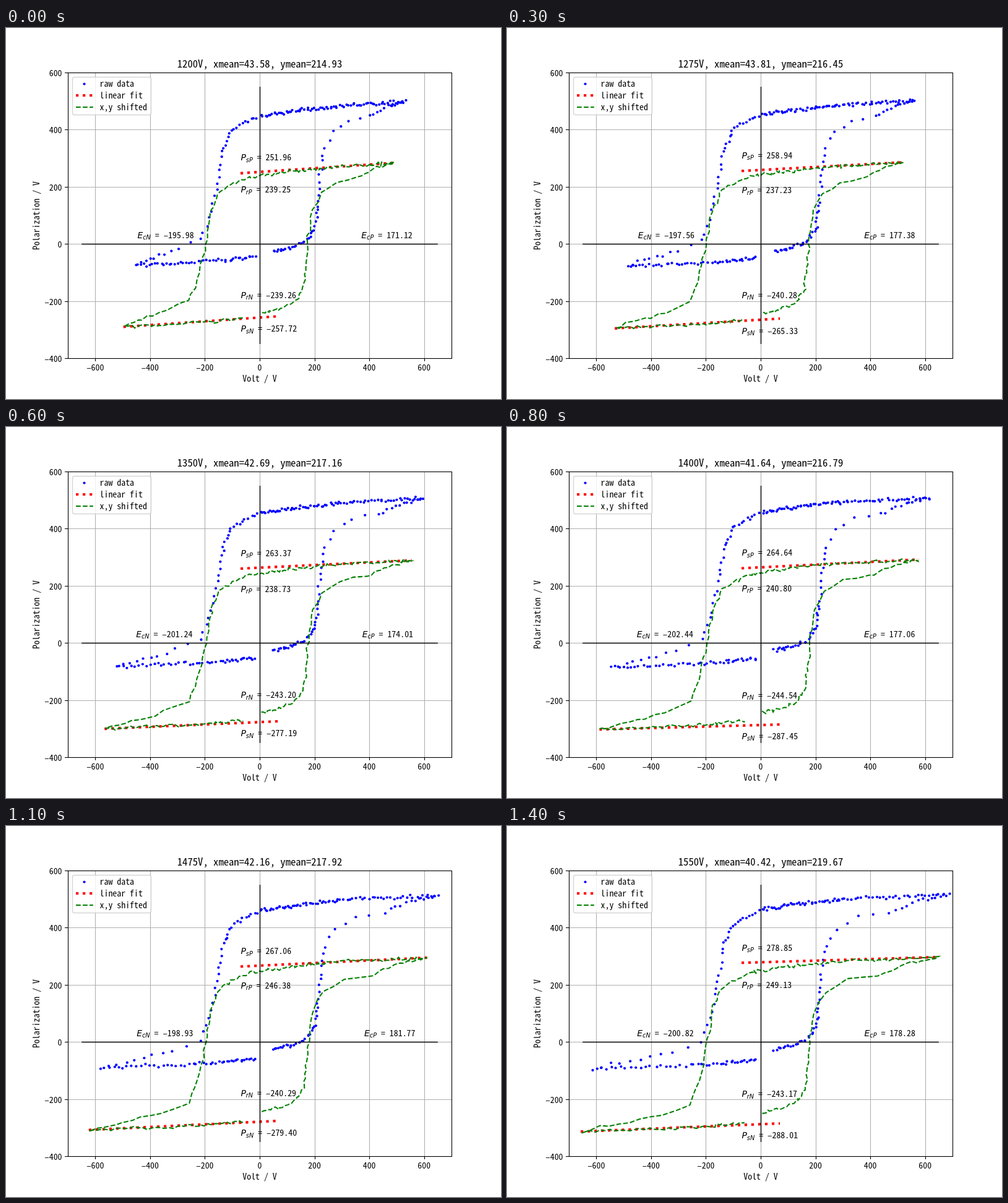
An HTML page with a canvas that plays this animation: 800 by 600 pixels, repeating every 1500 ms.

```html
<!DOCTYPE html>
<html lang="en">
<head>
<meta charset="utf-8">
<title>Hysteresis loop</title>
<style>
  html, body { margin: 0; overflow: hidden; background: #fff; }
  canvas { display: block; }
</style>
</head>
<body>
<canvas id="stage" width="800" height="600"></canvas>
<script>
const ctx = document.getElementById('stage').getContext('2d');
const MONO = '"Noto Sans Mono CJK SC", "Noto Sans Mono CJK JP", "Noto Sans CJK SC", monospace';
const SANS = 'italic "DejaVu Sans", sans-serif';
const SIZE = 13.89;
const LAST = 14;

// Measured readouts: step, xmean, ymean, PsP, PrP, PrN, PsN, EcN, EcP
const READOUTS = [
  [0, 43.58, 214.93, 251.96, 239.25, -239.26, -257.72, -195.98, 171.12],
  [2, 43.90, 215.36, 255.78, 237.80, -238.70, -263.73, -195.10, 183.80],
  [4, 43.73, 217.54, 262.09, 236.65, -241.87, -266.93, -200.03, 170.97],
  [8, 41.64, 216.79, 264.64, 240.80, -244.54, -287.45, -202.44, 177.06],
  [10, 42.13, 217.44, 264.55, 246.73, -239.24, -279.54, -199.13, 182.17],
  [13, 42.23, 218.89, 272.08, 245.67, -242.39, -279.12, -198.53, 180.97],
  [14, 40.42, 219.67, 278.85, 249.13, -243.17, -288.01, -200.82, 178.28]
];

// Corners of the smallest loop: x, y, samples up to the next corner
const RISE = [
  [432, 361, 10], [462, 355, 6], [484, 345, 6], [499, 326, 7], [505, 282, 4], [508, 238, 4],
  [515, 195, 2], [529, 168, 2], [555, 149, 2], [589, 143, 5], [618, 127, 7]
];
const RETURN = [
  [645, 119, 30], [540, 126, 22], [470, 134, 20], [412, 142, 5], [387, 153, 5], [364, 166, 6],
  [350, 200, 6], [340, 262, 4], [328, 308, 3], [315, 341, 2], [280, 358, 2], [257, 365, 6],
  [209, 384, 20], [300, 379, 10], [350, 376, 15], [403, 370, 1]
];

const px = v => 410 + v * 620 / 1400;
const py = p => 349.2 - p * 0.462;
const snap = v => Math.round(v) + 0.5;
const mix = (a, b, t) => a + (b - a) * t;
const minus = s => String(s).replace('-', '–');

function random(seed) {
  return () => {
    seed = seed + 0x6D2B79F5 | 0;
    let t = Math.imul(seed ^ seed >>> 15, 1 | seed);
    t ^= t + Math.imul(t ^ t >>> 7, 61 | t);
    return ((t ^ t >>> 14) >>> 0) / 4294967296;
  };
}

function readoutsAt(step) {
  const i = Math.max(1, READOUTS.findIndex(r => r[0] >= step));
  const a = READOUTS[i - 1], b = READOUTS[i];
  return a.map((v, j) => mix(v, b[j], (step - a[0]) / (b[0] - a[0])));
}

// Higher voltage stretches the loop tails outwards and the return branch vertically
function grownLoop(g) {
  const tail = (x, knee, reach) => Math.max(0, (x - knee) / reach) ** 1.7;
  const stretch = x => x + g * (69 * tail(x, 507, 138) - 72 * tail(x, 320, -111));
  return {
    rise: RISE.map(([x, y, n]) => [stretch(x), y - 9 * g * tail(x, 507, 138), n]),
    back: RETURN.map(([x, y, n]) => [stretch(x), mix(250, y, 1 + 0.065 * g), n])
  };
}

function samples(corners, seed) {
  const rnd = random(seed);
  const noise = size => (rnd() + rnd() - 1) * size;
  return corners.flatMap(([x, y, n], i) => {
    const [nx, ny] = corners[i + 1] || [x, y];
    return Array.from({ length: n }, (_, j) =>
      [mix(x, nx, j / n) + noise(3), mix(y, ny, j / n) + noise(3.5)]);
  });
}

function stroke(points, color, width, dash = []) {
  ctx.beginPath();
  points.forEach(p => ctx.lineTo(...p));
  ctx.setLineDash(dash);
  ctx.strokeStyle = color;
  ctx.lineWidth = width;
  ctx.stroke();
  ctx.setLineDash([]);
}
const dotted = points => stroke(points, '#f00', 4.17, [4.17, 6.87]);
const dashed = points => stroke(points, '#008000', 2.08, [7.71, 3.33]);

function dot([x, y]) {
  ctx.fillStyle = '#00f';
  ctx.beginPath();
  ctx.arc(x, y, 2.1, 0, 7);
  ctx.fill();
}

// Draws a string and returns its right edge
function text(s, x, y, align = 'left', size = SIZE, font = MONO) {
  ctx.font = font === SANS ? SANS.replace('italic', `italic ${size}px`) : `${size}px ${font}`;
  ctx.textAlign = align;
  ctx.fillStyle = '#000';
  ctx.fillText(s, x, y);
  return x + ctx.measureText(s).width;
}

function formula(letter, sub, value, x, y) {
  x = text(letter, x, y, 'left', SIZE, SANS);
  x = text(sub, x, y + 2.2, 'left', SIZE * 0.7, SANS);
  text(' = ' + minus(value.toFixed(2)), x, y);
}

function axes() {
  for (let v = -600; v <= 600; v += 200) {
    const x = snap(px(v));
    stroke([[x, 72], [x, 534]], '#b0b0b0', 1.1);
    stroke([[x, 534], [x, 539]], '#000', 1.1);
    text(minus(v), px(v), 554, 'center');
  }
  for (let p = -400; p <= 600; p += 200) {
    const y = snap(py(p));
    stroke([[100, y], [720, y]], '#b0b0b0', 1.1);
    stroke([[95, y], [100, y]], '#000', 1.1);
    text(minus(p), 90.5, y + 5, 'right');
  }
  text('Volt / V', 410, 572, 'center');
  ctx.save();
  ctx.translate(54, 303.5);
  ctx.rotate(-Math.PI / 2);
  text('Polarization / V', 0, 0, 'center');
  ctx.restore();
}

function legend() {
  ctx.beginPath();
  ctx.roundRect(107.5, 79.5, 127, 61, 3);
  ctx.fillStyle = 'rgba(255,255,255,.8)';
  ctx.fill();
  ctx.strokeStyle = 'rgba(204,204,204,.8)';
  ctx.lineWidth = 1.39;
  ctx.stroke();
  dot([126.5, 90.5]);
  dotted([[113, 109], [140.8, 109]]);
  dashed([[113, 128], [140.8, 128]]);
  ['raw data', 'linear fit', 'x,y shifted'].forEach((s, i) => text(s, 151.5, 94.5 + 19 * i));
}

function draw(step) {
  const [, xmean, ymean, psP, prP, prN, psN, ecN, ecP] = readoutsAt(step);
  const { rise, back } = grownLoop(step / LAST);
  const raw = samples([...rise, ...back], step * 977 + 5);
  const center = ([x, y]) => [x - xmean * 620 / 1400, y + ymean * 0.462];
  const apex = center(back[0]);
  const nadir = center(back.reduce((a, b) => b[0] < a[0] ? b : a));
  // Point on the line through an end and the value at zero volts
  const fit = (v, [endX, endY], zero) => [px(v), mix(py(zero), endY, (px(v) - 410) / (endX - 410))];

  ctx.fillStyle = '#fff';
  ctx.fillRect(0, 0, 800, 600);
  axes();
  raw.forEach(dot);
  dotted([fit(-70, apex, psP), apex]);
  dotted([nadir, fit(70, nadir, psN)]);
  dashed(raw.map(center));
  stroke([[px(-650), 349.5], [px(650), 349.5]], '#000', 1.39);
  stroke([[410.5, py(550)], [410.5, py(-350)]], '#000', 1.39);
  ctx.strokeStyle = '#000';
  ctx.lineWidth = 1.1;
  ctx.strokeRect(100.5, 72.5, 620, 462);

  formula('P', 'sP', psP, 379.5, py(psP + 40));
  formula('P', 'rP', prP, 379.5, py(prP - 60));
  formula('P', 'rN', prN, 379.5, py(prN + 50));
  formula('P', 'sN', psN, 379.5, py(psN - 50));
  formula('E', 'cN', ecN, px(ecN - 250), py(20));
  formula('E', 'cP', ecP, px(ecP + 200), py(20));
  text(`${1200 + 25 * step}V, xmean=${xmean.toFixed(2)}, ymean=${ymean.toFixed(2)}`, 410, 64, 'center', 16.67);
  legend();
}

let shown = -1;
function tick() {
  const step = Math.floor(performance.now() % 1500 / 100);
  if (step !== shown) draw(shown = step);
  requestAnimationFrame(tick);
}
tick();
</script>
</body>
</html>
```
